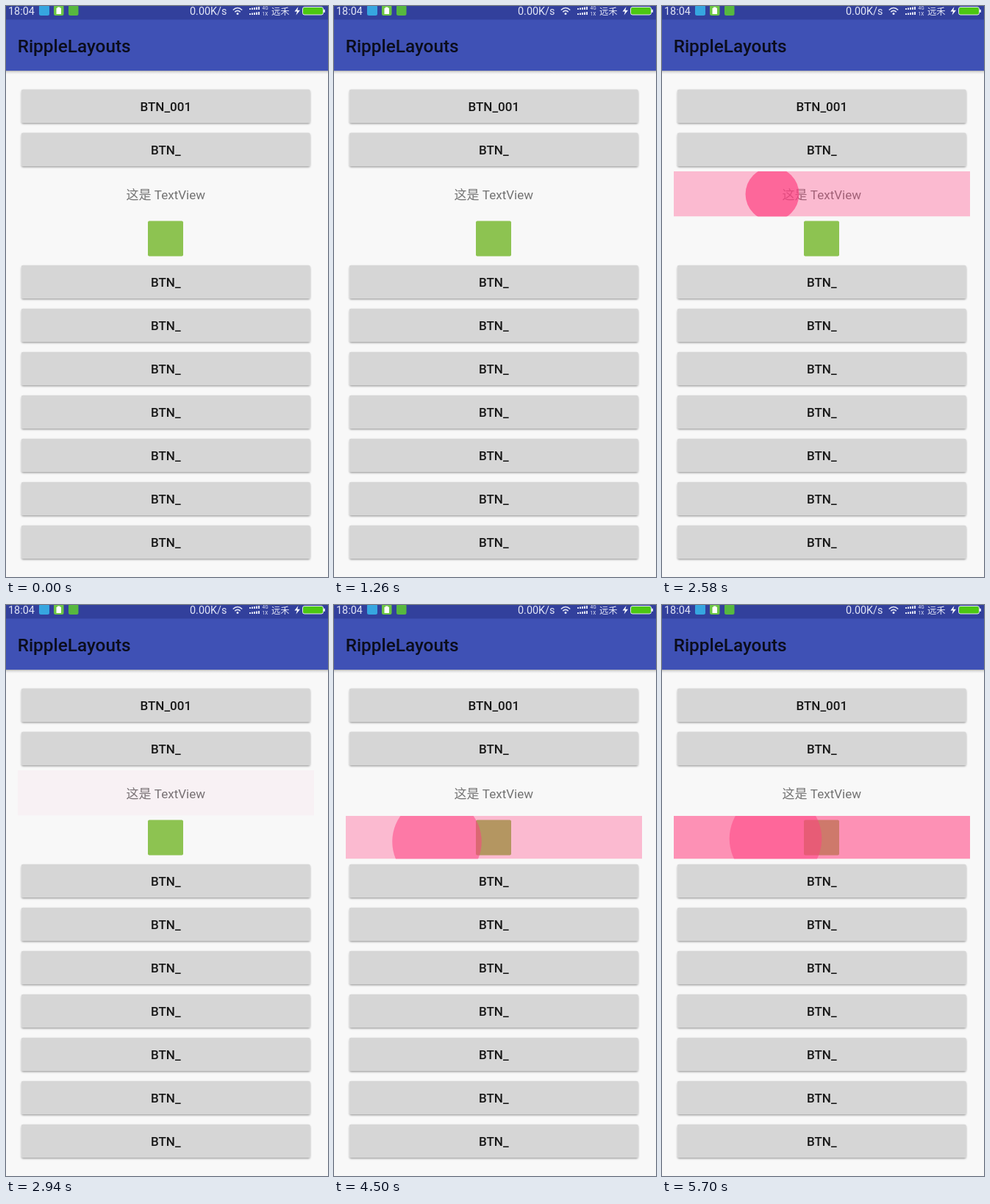
Animation of 438x777 px, one loop 5760 ms. Source, as an HTML page:

```html
<!DOCTYPE html>
<html lang="zh">
<head>
<meta charset="utf-8">
<title>RippleLayouts</title>
<style>
  html, body { margin: 0; width: 100%; height: 100%; overflow: hidden; background: #f8f8f8; }
  svg { display: block; width: 100vw; height: 100vh; }
  text { font-family: Roboto, "Noto Sans CJK SC", "Noto Sans CJK", sans-serif; }
  .status { fill: #e3e6f6; font-size: 14.4px; }
  .tiny { fill: #e3e6f6; font-size: 6.5px; }
  .label { font-size: 17.03px; font-weight: 500; fill: #161616; text-anchor: middle; }
</style>
</head>
<body>
<svg id="stage" viewBox="0 0 438 777" preserveAspectRatio="none">
  <defs>
    <linearGradient id="barShade" x2="0" y2="1">
      <stop offset="0" stop-color="#000" stop-opacity=".27"/>
      <stop offset=".45" stop-color="#000" stop-opacity=".08"/>
      <stop offset="1" stop-color="#000" stop-opacity="0"/>
    </linearGradient>
    <filter id="lift" x="-5%" y="-20%" width="110%" height="150%">
      <feDropShadow dx="0" dy="1.5" stdDeviation="1.1" flood-color="#000" flood-opacity=".34"/>
    </filter>
  </defs>
  <rect width="438" height="777" fill="#f8f8f8"/>
  <rect y="88" width="438" height="5" fill="url(#barShade)"/>
  <rect y="18" width="438" height="70" fill="#3f51b5"/>
  <rect width="438" height="18.5" fill="#32409c"/>

  <text class="status" x="3" y="12">18:04</text>
  <rect x="45" y="-1" width="14" height="14" rx="2.5" fill="#36a6e0"/>
  <rect x="65" y="-1" width="13.5" height="14" rx="2.5" fill="#6cc644"/>
  <path d="M70 1.5h3.5v1.2h1.5v8.3h-6.500v-8.300h1.500z" fill="#fff"/>
  <rect x="85" y="-1" width="13.5" height="14" rx="2.5" fill="#57b83f"/>
  <text class="status" x="250" y="12">0.00K/s</text>
  <g fill="none" stroke="#e3e6f6" stroke-width="1.6">
    <path d="M308.800 5.500Q315 -.5 321.200 5.500M311.300 8.100Q315 4.700 318.700 8.100"/>
  </g>
  <circle cx="315" cy="10.600" r="1.500" fill="#e3e6f6"/>
  <g id="signal" fill="#e3e6f6"></g>
  <text class="tiny" x="348.500" y="5.300">4G</text>
  <text class="tiny" x="348.500" y="12.500">1X</text>
  <text class="status" x="361" y="11.500" style="font-size:12.300px">远禾</text>
  <path d="M397.500 1L392.500 7.500H396L394.500 12.500L400 5.800H396.300Z" fill="#fff"/>
  <rect x="403.500" y="1.500" width="28" height="10.500" rx="2.500" fill="#4cc712" stroke="#e3e6f6"/>
  <rect x="432" y="4.500" width="2" height="4.500" rx="1" fill="#e3e6f6"/>

  <text x="15.700" y="62.800" style="font-size:24.330px;font-weight:500" fill="#0b0d1c">RippleLayouts</text>
  <g id="buttons"></g>
  <text x="217.300" y="262.500" text-anchor="middle" style="font-size:17.030px" fill="#737373">这是 TextView</text>
  <rect x="193" y="292.500" width="48" height="48" rx="2" fill="#8dc351"/>
  <rect id="veil" x="16" y="287" width="403" height="59" fill="#fff"/>
  <g id="ripples"></g>
</svg>
<script>
const LOOP = 5760, STEP = 60, PINK = '#ff4081';
const $ = id => document.getElementById(id);

function add(parent, tag, attrs, text) {
  const el = document.createElementNS('http://www.w3.org/2000/svg', tag);
  set(el, attrs);
  if (text) el.textContent = text;
  return parent.appendChild(el);
}
function set(el, attrs) {
  for (const k in attrs) el.setAttribute(k, attrs[k]);
}
const clamp = (v, lo = 0, hi = 1) => Math.min(hi, Math.max(lo, v));
const ramp = (t, a, b) => clamp((t - a) / (b - a));

for (let row = 0; row < 2; row++)
  for (let i = 0; i < 5; i++) {
    const h = 2 + i * 0.5;
    add($('signal'), 'rect', { x: 331 + i * 3, y: 5 + row * 7 - h, width: 2, height: h });
  }

const buttonBox = y => ({ x: 20.8, y, w: 393, h: 45.3, r: 2.4 });
const tops = [113.6, 172.6, ...Array.from({ length: 7 }, (_, i) => 352.7 + 59 * i)];
tops.forEach((y, i) => {
  const b = buttonBox(y);
  add($('buttons'), 'rect', { x: b.x, y, width: b.w, height: b.h, rx: b.r, fill: '#d6d6d6', filter: 'url(#lift)' });
  add($('buttons'), 'text', { class: 'label', x: 217.3, y: y + 29.6 }, i ? 'BTN_' : 'BTN_001');
});

// Pink tap: tinted box at once, a growing circle that fades, then the tint fades.
function pinkState(age, hold = 0) {
  return {
    r: 0.405 * age,
    circle: 0.9 * (1 - ramp(age, 0, 360)),
    tint: 0.337 * (1 - ramp(age, 270 + hold, 470 + hold))
  };
}
// Button press: soft grey highlight.
function greyState(age) {
  const fade = 1 - ramp(age, 330, 630);
  return { r: 20 + 0.75 * age, circle: 0.08 * fade, tint: 0.06 * ramp(age, 0, 90) * fade };
}

const textBox = { x: 16, y: 225, w: 403, h: 61.5, r: 0 };
const imageBox = { x: 16, y: 287, w: 403, h: 58.5, r: 0 };
const taps = [
  { start: 30, end: 660, x: 150, y: 136, box: buttonBox(tops[0]), grey: true },
  { start: 630, end: 1260, x: 150, y: 195, box: buttonBox(tops[1]), grey: true },
  { start: 1890, end: 2520, x: 126, y: 256, box: textBox },
  { start: 2490, end: 3240, x: 150, y: 256, box: textBox },
  { start: 3210, end: 3720, x: 145, y: 321, box: imageBox },
  { start: 4350, end: 4740, x: 140, y: 322, box: imageBox },
  { start: 4950, end: 5430, x: 136, y: 323, box: imageBox },
  { start: 5245, end: LOOP, x: 146, y: 320, box: imageBox, hold: 190 },
  { start: 5545, end: LOOP, x: 154.5, y: 318, box: imageBox }
];

taps.forEach((tap, i) => {
  const b = tap.box, fill = tap.grey ? '#000' : PINK;
  const shape = { x: b.x, y: b.y, width: b.w, height: b.h, rx: b.r };
  const clip = add(document.querySelector('defs'), 'clipPath', { id: 'clip' + i });
  add(clip, 'rect', shape);
  tap.group = add($('ripples'), 'g', { 'clip-path': `url(#clip${i})` });
  tap.tint = add(tap.group, 'rect', { ...shape, fill });
  tap.circle = add(tap.group, 'circle', { cx: tap.x, cy: tap.y, fill });
});

function draw(time) {
  const t = Math.floor((time % LOOP) / STEP) * STEP;
  for (const tap of taps) {
    const on = t >= tap.start && t < tap.end;
    set(tap.group, { display: on ? 'inline' : 'none' });
    if (!on) continue;
    const age = t - tap.start;
    // A faint pink tint lingers until the tap's end.
    const s = tap.grey ? greyState(age) : pinkState(Math.min(age, 450 + (tap.hold || 0)), tap.hold);
    set(tap.tint, { opacity: s.tint });
    set(tap.circle, { r: s.r, opacity: s.circle });
  }
  set($('veil'), { opacity: t >= 3720 && t < 4380 ? 0.28 : 0 });
}

const began = performance.now();
function frame() {
  draw(performance.now() - began);
  requestAnimationFrame(frame);
}
frame();
</script>
</body>
</html>
```
